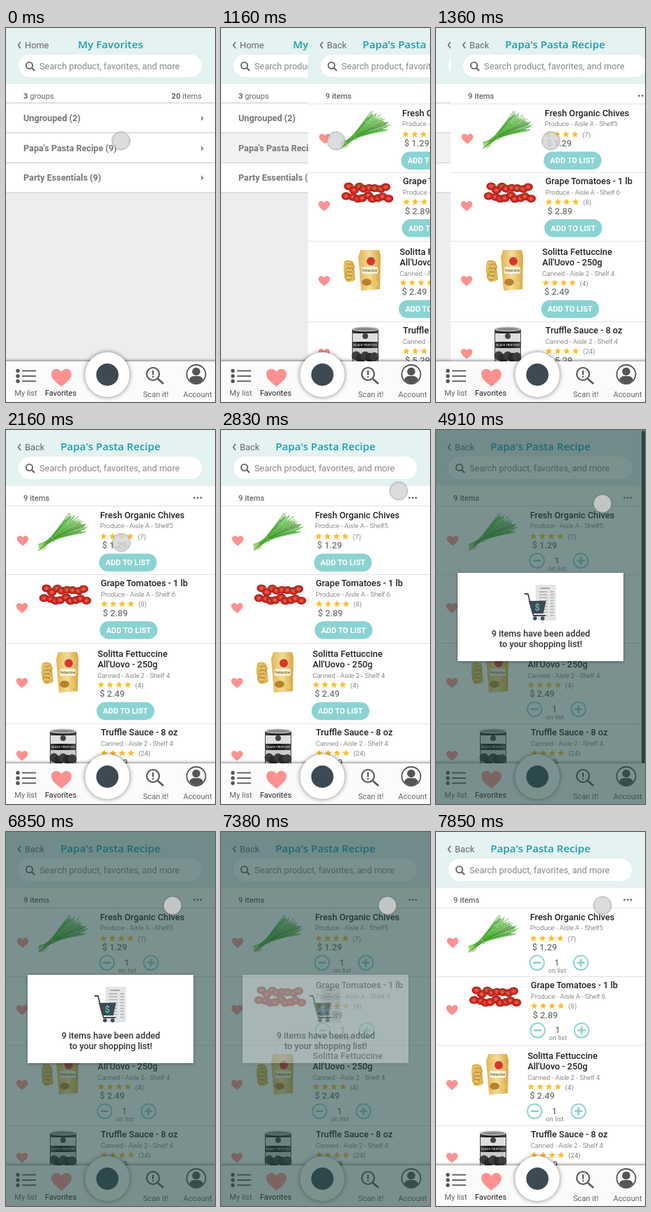
An HTML page for the animation above (8 s loop, 300x534 px).

```html
<!DOCTYPE html>
<html lang="en">
<head>
<meta charset="utf-8">
<title>Shopping list</title>
<style>
html, body { margin: 0; width: 100%; height: 100%; overflow: hidden; background: #fff; }
svg { display: block; width: 100vw; height: 100vh; font-family: Roboto, "Open Sans", sans-serif; }
.title { font-family: "Open Sans", Roboto, sans-serif; }
.bar { filter: drop-shadow(0 -1px 2px rgba(0,0,0,.5)); }
.disc { filter: drop-shadow(0 0 3px rgba(0,0,0,.5)); }
.card { filter: drop-shadow(0 1px 2px rgba(0,0,0,.35)); }
#cursor { filter: drop-shadow(0 0 1.2px rgba(0,0,0,.45)); }
</style>
</head>
<body>
<svg id="stage" viewBox="0 0 300 534"></svg>
<script>
const LOOP = 8000;
const TEAL = '#1b9fae', MINT = '#8bd3d3', SLATE = '#3d4a54', PINK = '#ff9190';

// Drawing helpers, each returns SVG markup
const text = (x, y, size, weight, fill, s, anchor = 'start') =>
  `<text x="${x}" y="${y}" font-size="${size}" font-weight="${weight}" fill="${fill}" text-anchor="${anchor}">${s}</text>`;
const rect = (x, y, w, h, fill, r = 0, more = '') =>
  `<rect x="${x}" y="${y}" width="${w}" height="${h}" rx="${r}" fill="${fill}" ${more}/>`;
const circle = (x, y, r, fill, more = '') =>
  `<circle cx="${x}" cy="${y}" r="${r}" fill="${fill}" ${more}/>`;
const ellipse = (x, y, rx, ry, fill) =>
  `<ellipse cx="${x}" cy="${y}" rx="${rx}" ry="${ry}" fill="${fill}"/>`;
const line = (d, stroke, w) =>
  `<path d="${d}" fill="none" stroke="${stroke}" stroke-width="${w}"/>`;
const shape = (d, fill) => `<path d="${d}" fill="${fill}"/>`;
const group = (id, s) => `<g id="${id}">${s}</g>`;
const repeat = (n, f) => Array.from({ length: n }, (_, i) => f(i)).join('');
const rand = n => { const v = Math.sin(n * 12.9898) * 43758.5453; return v - Math.floor(v); };

const heart = (x, y, w) => `<path transform="translate(${x} ${y}) scale(${w / 20})" fill="${PINK}"
  d="M0 9C-4 5.5-10 2-10-3.2C-10-9-3-10.5 0-5.5C3-10.5 10-9 10-3.2C10 2 4 5.5 0 9Z"/>`;

const star = (x, y) => `<polygon fill="#fbc02d" points="${repeat(10, i => {
  const r = i % 2 ? 2.3 : 5.2, a = i * Math.PI / 5;
  return `${(x + r * Math.sin(a)).toFixed(1)},${(y - r * Math.cos(a)).toFixed(1)} `;
})}"/>`;

const header = (back, title) =>
  rect(0, 0, 300, 80, '#e4f2f1') +
  line('M21 20L17.5 24.5L21 29', '#666', 1.5) +
  text(27, 29, 12.8, 400, '#666', back) +
  `<g class="title">${text(150, 29, 15.2, 600, TEAL, title, 'middle')}</g>` +
  rect(18, 38, 263, 32, '#fff', 16) +
  circle(33.5, 53.5, 4.6, 'none', 'stroke="#666" stroke-width="1.9"') +
  line('M37 57L41 61', '#666', 2.3) +
  text(48, 59, 12.8, 400, '#888', 'Search product, favorites, and more');

function favoritesPage() {
  const rows = [['Ungrouped (2)', 133], ["Papa's Pasta Recipe (9)", 176], ['Party Essentials (9)', 218]];
  return rect(0, 0, 300, 534, '#ededed') + header('Home', 'My Favorites') +
    rect(0, 80, 300, 155, '#fff') +
    group('pressed', rect(0, 150, 300, 42, '#f2f2f2')) +
    text(25, 101, 11.2, 400, '#666', '<tspan font-weight="700">3</tspan> groups') +
    text(281, 101, 11.2, 400, '#666', '<tspan font-weight="700">20</tspan> items', 'end') +
    [107, 149.5, 192.5, 235].map(y => line(`M0 ${y}H300`, '#d6d6d6', 1.3)).join('') +
    rows.map(([s, y]) => text(25, y, 12.7, 700, '#777', s) +
      shape(`M280 ${y - 8}l4 4l-4 4z`, '#999')).join('');
}

// Leaves run from the pale roots through the tie and fan out to the tips
const chives = () => repeat(34, i => {
  const u = i / 33, a = -0.98 + 0.8 * u;
  const len = 44 + 11 * Math.sin(Math.PI * u / 1.4) - 12 * rand(i);
  const x = 66 + len * Math.cos(a), y = 155 + len * Math.sin(a);
  const rootX = 46 + 9 * rand(i + 50), rootY = 163 + 9 * rand(i + 90);
  return line(`M${rootX} ${rootY}C60 160 ${69 + 4 * u} ${148 + 5 * u} ${x} ${y}`,
      `hsl(${98 + 18 * rand(i + 7)} 55% ${30 + 24 * rand(i + 3)}%)`, .9) +
    line(`M${rootX} ${rootY}L${rootX + 6} ${rootY - 3}`, '#cfe0a8', .8);
}) + line('M65 152L69 160', '#9aa86a', 1.5);

const tomatoes = () => repeat(17, i => {
  const back = i < 8, k = back ? i : i - 8;
  const x = (back ? 57 : 54) + k * 7.4 + 3 * rand(i + 4), y = (back ? 229 : 241) + 6 * rand(i) - 3;
  return ellipse(x, y, 6.8, 5.6, 'url(#red)');
}) + line('M62 226q14-4 26 0t20 2', '#6d8a3a', .8);

const pasta = () =>
  shape('M52 333q7-4 13 1l3 25q-8 6-14 2q-5-14-2-28z', '#dcb452') +
  repeat(9, i => `<ellipse cx="${57 + 5 * rand(i)}" cy="${338 + i * 2.6}" rx="5" ry="3.5" fill="none" stroke="${i % 2 ? '#b88a2c' : '#efd27a'}" stroke-width="1"/>`) +
  shape('M75 317h27l2 8l-1 48l-27 2l-4-48z', 'url(#pack)') +
  rect(77, 341, 23, 10, '#f8f0d8', 2) + text(88.5, 348, 4.5, 700, '#8a6a35', 'Fettuccine', 'middle') +
  ellipse(84, 363, 7, 5, '#b9822a') + ellipse(95, 365, 5, 4, '#e9c86a') +
  circle(90, 333, 6, '#d8352f');

const can = () =>
  rect(63, 430, 38, 60, 'url(#tin)') +
  ellipse(82, 430, 19, 3.5, '#c4c4c4') + ellipse(82, 430, 16, 2.2, '#8b8b8b') +
  rect(64, 436, 36, 12, '#dedede') + circle(82, 440, 4, '#444') +
  text(82, 453.5, 4.2, 500, '#ddd', 'BLACK TRUFFLES', 'middle') +
  rect(64, 457, 36, 30, '#c9c9c9') +
  repeat(5, i => circle(69 + i * 6.5, 468 + 4 * rand(i), 6.5, i % 2 ? '#2b2b2b' : '#3d3d3d'));

// x, title lines, first baseline, details, their baseline, star centre, votes, price, heart
const products = [
  [135, ['Fresh Organic Chives'], 126, 'Produce - Aisle A - Shelf5', 139.5, 152, 7, '1.29', 24, 158],
  [136, ['Grape Tomatoes - 1 lb'], 223, 'Produce - Aisle A - Shelf 6', 238, 248.5, 8, '2.89', 23, 254],
  [131.5, ['Solitta Fettuccine', "All'Uovo - 250g"], 324, 'Canned - Aisle 2 - Shelf 4', 354, 364, 4, '2.49', 23, 361],
  [136, ['Truffle Sauce - 8 oz'], 436, 'Canned - Aisle 2 - Shelf 4', 451, 461.5, 24, '5.29', 23, 465]
];

const product = ([x, title, y, info, infoY, starY, votes, price, hx, hy]) =>
  heart(hx, hy, 16.5) +
  title.map((s, i) => text(x, y + i * 15, 12.8, 500, '#222', s)).join('') +
  text(x, infoY, 9.6, 300, '#555', info) +
  repeat(4, i => star(x + 5 + i * 12.8, starY)) +
  text(x + 54, starY + 3.5, 9.6, 400, '#888', `(${votes})`) +
  text(x + 3, starY + 17, 12.8, 500, '#777', `$ ${price}`);

const addButton = ([x, , , , , y]) =>
  rect(x - 1.5, y + 24.5, 83, 25.5, MINT, 12.7) +
  text(x + 40, y + 41.3, 11.1, 700, '#fff', 'ADD TO LIST', 'middle');

const counter = ([x, , , , , y]) => {
  const cy = y + 34.7, ring = `stroke="${MINT}" stroke-width="1.9"`;
  return circle(x + 10, cy, 10.3, '#fff', ring) + circle(x + 73, cy, 10.3, '#fff', ring) +
    line(`M${x + 4.5} ${cy}h11M${x + 67.5} ${cy}h11m-5.5-5.5v11`, MINT, 2.8) +
    text(x + 38.5, cy + 3.8, 12.7, 400, '#555', '1', 'middle') +
    text(x + 39, cy + 13.8, 9.6, 400, '#888', 'on list', 'middle');
};

const recipePage = () =>
  rect(0, 0, 300, 534, '#fff') + header('Back', "Papa's Pasta Recipe") +
  text(25, 101, 11.2, 500, '#666', '9 items') +
  repeat(3, i => circle(270.5 + i * 4.7, 96.7, 1.3, '#555')) +
  [108.5, 206.5, 304.5, 419.5].map(y => line(`M0 ${y}H300`, '#e2e2e2', 1)).join('') +
  chives() + tomatoes() + pasta() + can() + products.map(product).join('') +
  group('buttons', products.map(addButton).join('')) +
  group('counters', products.map(counter).join(''));

const menu = () =>
  rect(182, 88, 114, 33, '#fff', 2, 'class="card"') +
  text(239, 109, 12.8, 400, '#555', 'Add all to list', 'middle');

const navBar = () =>
  rect(-5, 476, 310, 64, '#fbfbfb', 0, 'class="bar"') +
  circle(145.5, 495, 32, '#fff', 'class="disc"') + circle(145.5, 495, 16, SLATE) +
  repeat(3, i => circle(17, 489.5 + i * 7.4, 2.7, '#555')) +
  line('M23 489.5h20m-20 7.4h20m-20 7.4h20', '#666', 2) +
  heart(79.5, 499, 29) +
  circle(211, 494, 9, 'none', 'stroke="#555" stroke-width="2.1"') +
  line('M218 501L226 508', '#555', 2.6) + line('M211 489v6.5m0 1.5v2', '#555', 2) +
  circle(273, 494.5, 13.5, '#fff', 'stroke="#555" stroke-width="1.8"') +
  circle(273, 490.5, 5.8, '#555') + shape('M263 502q2-5 7-5h6q5 0 7 5a12 12 0 0 1-20 0z', '#555') +
  text(28.5, 525, 11.1, 400, '#666', 'My list', 'middle') +
  text(78.5, 525, 11.1, 400, '#222', 'Favorites', 'middle') +
  text(215, 527, 11.1, 400, '#666', 'Scan it!', 'middle') +
  text(275, 527, 11.1, 400, '#666', 'Account', 'middle');

const popup = () =>
  rect(31, 204, 238, 126, '#fff', 0, 'class="card"') +
  shape('M143 221h29v51h-25l-4-4z', '#e3e4e5') +
  line('M150 226h13', '#999', 1.6) +
  repeat(9, i => line(`M148 ${231 + i * 4.2}h12m4 0h5`, '#aaa', 1.3)) +
  line('M127 234h5l8 31h17', SLATE, 1.8) +
  shape('M133 244h25l-4 18h-16z', SLATE) +
  text(145.5, 258, 13, 500, '#5fd0c5', '$', 'middle') +
  circle(142, 269, 2.8, SLATE) + circle(153, 269, 2.8, SLATE) +
  text(150.5, 295, 12.7, 500, '#333', '9 items have been added', 'middle') +
  text(150.5, 310, 12.7, 500, '#333', 'to your shopping list!', 'middle');

const gradient = (id, kind, stops) => `<${kind}Gradient id="${id}">${stops.map((c, i) =>
  `<stop offset="${i / (stops.length - 1)}" stop-color="${c}"/>`).join('')}</${kind}Gradient>`;

const $ = id => document.getElementById(id);
$('stage').innerHTML =
  `<defs>${gradient('red', 'radial', ['#f2705c', '#d63328', '#a81a17'])}
  ${gradient('pack', 'linear', ['#e3b551', '#f3dc98', '#d9a641'])}
  ${gradient('tin', 'linear', ['#444', '#151515', '#222', '#4a4a4a'])}</defs>` +
  favoritesPage() + group('recipe', recipePage()) + group('menu', menu()) +
  rect(295, 1, 5, 475, '#424242', 2.5, 'id="scrollbar"') + navBar() +
  rect(0, 0, 300, 534, 'rgb(36,73,71)', 0, 'id="dim"') + group('popup', popup()) +
  circle(0, 0, 12.3, '#f0f0f0', 'id="cursor" fill-opacity=".7" stroke="#bbb" stroke-width="1"');

// Timing
const ramp = (t, a, b) => Math.min(1, Math.max(0, (t - a) / (b - a)));
const smooth = p => p * p * (3 - 2 * p);
const mix = (a, b, p) => a + (b - a) * p;
const set = (id, attrs) => { for (const k in attrs) $(id).setAttribute(k, attrs[k]); };
const show = (id, on) => set(id, { display: on ? 'inline' : 'none' });

function cursorAt(t) {
  const glide = (a, b, p) => ({ cx: mix(a[0], b[0], p), cy: mix(a[1], b[1], p) });
  if (t < 3060) return glide([165, 161], [255, 87], smooth(ramp(t, 2130, 2830)));
  if (t < 3200) return { cx: 257, cy: 85 };
  return glide([259, 83], [239, 105], smooth(ramp(t, 3910, 4240)));
}

function draw(t) {
  const slide = t < 1000 ? 300 : 300 * (1 - ramp(t, 975, 1500)) ** 2;
  set('recipe', { transform: `translate(${slide} 0)` });
  show('pressed', t >= 1000);
  show('buttons', t < 4840);
  show('counters', t >= 4840);
  show('menu', t >= 3740 && t < 4840);
  set('scrollbar', { opacity: ramp(t, 3910, 4240) - ramp(t, 5250, 5680) });
  const rise = t < 4840 ? 0 : t < 4910 ? .5 : 1;
  set('dim', { opacity: .6 * rise * (1 - ramp(t, 7650, 7850)) });
  set('popup', { opacity: rise * (1 - ramp(t, 6850, 7650)) });
  set('cursor', cursorAt(t));
}

const start = performance.now();
(function frame() {
  draw((performance.now() - start) % LOOP);
  requestAnimationFrame(frame);
})();
</script>
</body>
</html>
```
